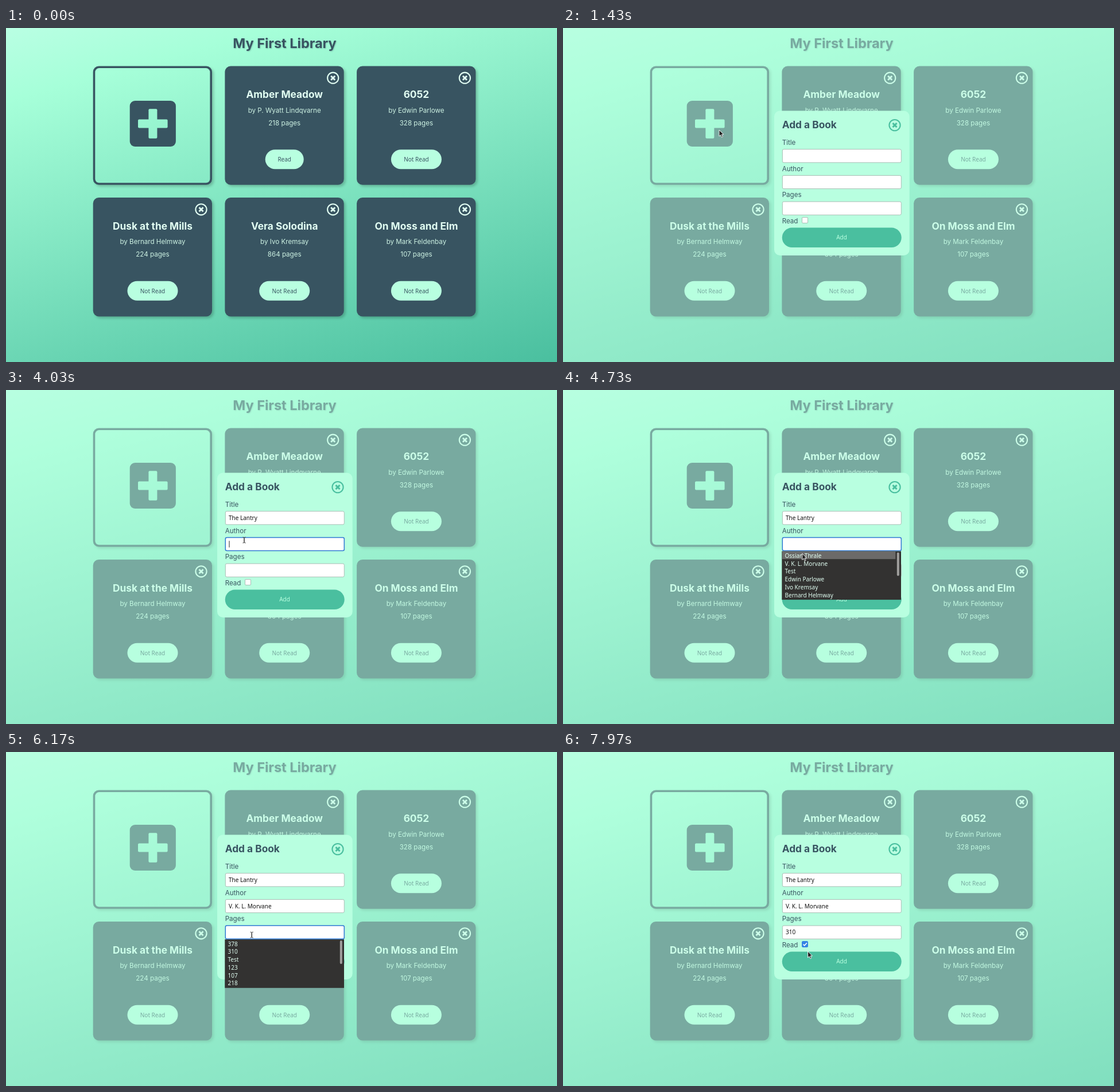
An HTML page for the animation above (8 s loop, 960 by 583 pixels).

```html
<!DOCTYPE html>
<html lang="en">
<head>
<meta charset="utf-8">
<title>My First Library</title>
<style>
  html, body { margin: 0; width: 100%; height: 100%; overflow: hidden; }
  body { background: linear-gradient(165deg, #b9ffe3, #a6ffd9 15%, #4abf9f); }
  svg { display: block; width: 100%; height: 100%; }
  text { font: 11.6px Inter, sans-serif; fill: #385461; }
  .mid { text-anchor: middle; }
  .heading { font-size: 23.5px; font-weight: 700; text-shadow: 1px 1px 2px #38546150; }
  .name { font-size: 17.3px; font-weight: 700; }
  .light { fill: #e2fff3; }
  .detail { fill: #cdf2e3; }
  .ui { font: 10px "Noto Sans", sans-serif; }
  .value { font-weight: 500; fill: #111; }
  .mint { fill: #b8ffe0; }
  .slate { fill: #385461; }
  .card { filter: drop-shadow(3px 3px 2px #0003); }
  .icon { fill: none; stroke: #e2fff3; stroke-width: 2.1; }
  .field { fill: #fff; stroke: #a9bdb4; }
  .field.focused { stroke: #2f78d2; stroke-width: 1.5; }
</style>
</head>
<body>
<svg id="stage" viewBox="0 0 960 583"></svg>
<script>
const LOOP = 8000, MODAL_OPENS = 1400, CHECKED = 7870, ROW = 13.75;

const books = [
  ["Amber Meadow", "P. Wyatt Lindqvarne", 218, true],
  ["6052", "Edwin Parlowe", 328],
  ["Dusk at the Mills", "Bernard Helmway", 224],
  ["Vera Solodina", "Ivo Kremsay", 864],
  ["On Moss and Elm", "Mark Feldenbay", 107],
];

// Times in ms: focus, list opens, hovered row turns orange, choice made, blur
const fields = [
  { label: "Title", y: 223.3, focus: 2270, open: 2530, active: 3130, pick: 3530, blur: 3870, caretOff: 3130,
    rows: ["Wavy Dune", "The Lantry", "Test", "Lantry's Song", "6052", "Vera Solodina"] },
  { label: "Author", y: 269, focus: 3870, open: 4130, active: 4760, pick: 4930, blur: 5430, caretOff: 4430,
    rows: ["Ossian Thrale", "V. K. L. Morvane", "Test", "Edwin Parlowe", "Ivo Kremsay", "Bernard Helmway"] },
  { label: "Pages", y: 314.7, focus: 5430, open: 5700, active: 6530, pick: 6800, blur: 7730, caretOff: 6070,
    rows: ["378", "310", "Test", "123", "107", "218"] },
];

// Pointer moves: first step, last step, number of steps, destination
const moves = [
  [630, 930, 4, 280, 193], [1030, 1130, 2, 272, 178], [1930, 2270, 6, 412, 212],
  [2530, 2570, 2, 413, 217], [2730, 2930, 4, 415, 248], [3130, 3730, 8, 415, 262],
  [4430, 4930, 7, 418, 303], [5070, 5430, 5, 429.5, 312], [6070, 6770, 10, 423, 348],
  [7270, 7730, 7, 421, 337], [7870, 7970, 3, 426.5, 348],
];

const text = (x, y, content, cls = "") => `<text x="${x}" y="${y}" class="${cls}">${content}</text>`;
const rect = (x, y, w, h, r, attrs = "") =>
  `<rect x="${x}" y="${y}" width="${w}" height="${h}" rx="${r}" ${attrs}/>`;
const closeIcon = (x, y, color = "#e2fff3") =>
  `<g class="icon" style="stroke:${color}" transform="translate(${x} ${y})"><circle r="9.6"/>
   <path d="M-3.5-3.5l7 7m0-7l-7 7" stroke-width="2.9"/></g>`;

function bookCard([name, author, pages, read], index) {
  const slot = index + 1;
  const x = 151.7 + slot % 3 * 229.7, y = 66.5 + Math.floor(slot / 3) * 229.6;
  const center = x + 103.8, width = read ? 67 : 88;
  return rect(x, y, 207.3, 207.3, 10, 'class="slate card"')
    + closeIcon(x + 188.3, y + 20.7)
    + text(center, y + 55.5, name, "name light mid")
    + text(center, y + 81, "by " + author, "detail mid")
    + text(center, y + 103.3, pages + " pages", "detail mid")
    + rect(center - width / 2, y + 145.7, width, 34, 17, 'class="mint"')
    + text(center, y + 166.5, read ? "Read" : "Not Read", "ui mid");
}

// The masks cut the card's inside and the plus sign out, so the backdrop shows through
const addCard = `
  <mask id="frame">${rect(140, 55, 235, 235, 0, 'fill="#fff"')}${rect(155.3, 70.1, 200.1, 200.1, 7)}</mask>
  <mask id="plus">${rect(215.7, 127, 80.2, 80, 9, 'fill="#fff"')}
    ${rect(230, 159.5, 51.6, 15, 2)}${rect(248.4, 141.2, 15, 51.6, 2)}</mask>
  ${rect(151.7, 66.5, 207.3, 207.3, 10, 'class="slate card" mask="url(#frame)"')}
  ${rect(215, 126, 82, 82, 0, 'class="slate" mask="url(#plus)"')}`;

const fieldMarkup = ({ label, y }, i) => `
  ${text(381.7, y - 19.3, label)}
  ${rect(382.3, y - 11.6, 207, 23.2, 2.5, `id="box${i}" class="field"`)}
  <text id="value${i}" class="ui value" x="388" y="${y + 3.7}"></text>
  <path id="caret${i}" d="M389 ${y - 5.7}v11.5" stroke="#222"/>`;

const listMarkup = ({ y, rows }, i) => `
  <g id="list${i}" transform="translate(0 ${y + 12.4})">
    ${rect(381.3, 0, 207.7, 84.7, 0, 'fill="#333231"')}
    ${rect(382, 0, 197.3, ROW, 0, `id="row${i}"`)}
    ${rect(581.8, 2, 4, 41, 2, 'fill="#a09f9d"')}
    ${rows.map((row, n) => text(386.5, 11.6 + n * ROW, row, "ui light")).join("")}
  </g>`;

const outline = 'stroke="#fff" stroke-width="0.9" stroke-linejoin="round"';
document.getElementById("stage").innerHTML = `
  ${text(485.5, 35, "My First Library", "heading mid")}
  ${addCard}${books.map(bookCard).join("")}
  <rect id="veil" class="mint" width="960" height="583"/>
  <g id="modal">
    ${rect(368, 144.5, 235.7, 252.5, 10, 'class="mint"')}
    ${text(381.7, 174.5, "Add a Book", "name")}
    ${closeIcon(578, 169.6, "#4abf9f")}
    ${fields.map(fieldMarkup).join("")}
    ${text(381.7, 341, "Read")}
    ${rect(416.5, 330.5, 10, 10, 1.5, 'id="checkbox"')}
    <path id="tick" d="M418.5 335.7l2.2 2.2 4.2-4.6" fill="none" stroke="#fff" stroke-width="1.6"/>
    ${rect(381.7, 348.6, 208, 34.4, 17.2, 'fill="#4abf9f"')}
    ${text(485.5, 369.3, "Add", "ui mid mint")}
  </g>
  ${fields.map(listMarkup).join("")}
  <g id="pointer">
    <path id="arrow" d="M0 0v11l2.6-2.3 1.8 4 1.9-.9-1.8-3.9h3.5z" fill="#222" ${outline}/>
    <path id="hand" d="M-1.3 1q1.3-2 2.6 0v5l4.6 1q1.6.5 1.5 2l-1 5.5h-6l-3.6-5q.4-2 1.9-.8z" fill="#222" ${outline}/>
    <path id="beam" d="M-2.5-5q2.5 0 2.5 1.5v7q0 1.5-2.5 1.5M2.5-5q-2.5 0-2.5 1.5v7q0 1.5 2.5 1.5" fill="none" stroke="#333"/>
  </g>`;

const el = id => document.getElementById(id);
const show = (id, visible) => el(id).style.display = visible ? "" : "none";

function pointerAt(t) {
  let x = 464, y = 66;
  for (const [start, end, steps, toX, toY] of moves) {
    if (t < start) break;
    const step = Math.floor((t - start) / (end - start) * (steps - 1) + 1e-6) + 1;
    const p = Math.min(1, step / steps);
    x += (toX - x) * p;
    y += (toY - y) * p;
  }
  return { x, y };
}

function drawField(field, i, t, pointer) {
  const { y, focus, open, active, pick, blur, caretOff, rows } = field;
  const listOpen = t >= open && t < pick;
  const row = Math.floor((pointer.y - y - 12.4) / ROW);
  el("box" + i).classList.toggle("focused", t >= focus && t < blur);
  el("value" + i).textContent = t >= pick ? rows[1] : "";
  show("caret" + i, t >= focus && t < caretOff);
  show("list" + i, listOpen);
  show("row" + i, row >= 0);
  el("row" + i).setAttribute("y", row * ROW);
  el("row" + i).setAttribute("fill", t < active ? "#6b6a69" : "#d03d14");
  return listOpen;
}

function draw(t) {
  const pointer = pointerAt(t), { x, y } = pointer;
  const modal = t >= MODAL_OPENS;
  const fade = !modal ? 0 : t < MODAL_OPENS + 30 ? 0.5 : 1;
  el("veil").setAttribute("opacity", fade / 2);
  el("modal").setAttribute("opacity", fade);

  const open = fields.map((field, i) => drawField(field, i, t, pointer));
  const checked = t >= CHECKED;
  el("checkbox").setAttribute("fill", checked ? "#3584e4" : "#fff");
  el("checkbox").setAttribute("stroke", checked ? "#3584e4" : "#a9bdb4");
  show("tick", checked);

  const overList = open.some((isOpen, i) => isOpen && y > fields[i].y + 12);
  const beam = modal && !overList && x > 382 && fields.some(f => Math.abs(y - f.y) < 12);
  const hand = !modal && x < 359 && y > 67;
  show("pointer", t >= moves[0][0]);
  show("beam", beam);
  show("hand", hand);
  show("arrow", !beam && !hand);
  el("pointer").setAttribute("transform", `translate(${x} ${y})`);
}

const began = performance.now();
function tick() {
  draw((performance.now() - began) % LOOP);
  requestAnimationFrame(tick);
}
tick();
</script>
</body>
</html>
```
